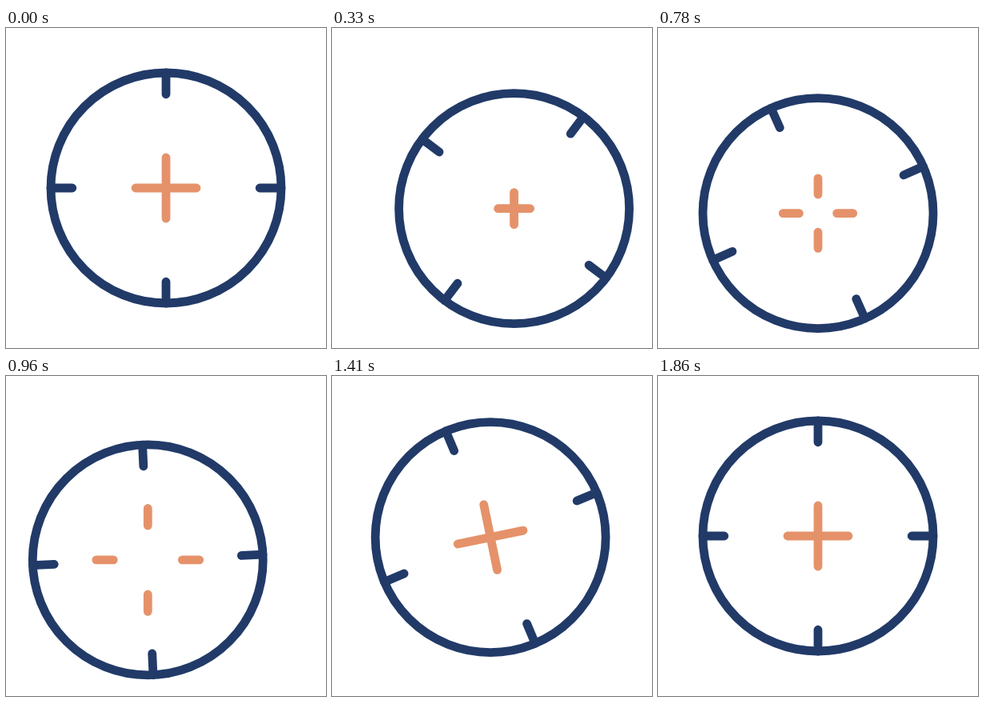
Recreate the animation shown at these times as an HTML page with a canvas. Size 400x400 px, loop 3.92 s.

```html
<!DOCTYPE html>
<html lang="en">
<head>
<meta charset="utf-8">
<title>Crosshair</title>
<style>
  html, body { margin: 0; width: 100%; height: 100%; overflow: hidden; background: #fff; }
  canvas { display: block; width: 100vmin; height: 100vmin; }
</style>
</head>
<body>
<canvas id="stage"></canvas>
<script>
const SIZE = 400, LOOP = 3920, STEP = 30, LAST = 62;
const NAVY = '#213a68', ORANGE = '#e5926a', LINE = 10.8;

const canvas = document.getElementById('stage');
const ctx = canvas.getContext('2d');

const mix = (a, b, p) => a + (b - a) * p;

// Cubic easing with flat ends: control points (x1, 0) and (x2, 1).
function ease(t, x1, x2) {
  if (t <= 0) return 0;
  if (t >= 1) return 1;
  let lo = 0, hi = 1, u = 0.5;
  for (let i = 0; i < 30; i++) {
    u = (lo + hi) / 2;
    const v = 1 - u;
    const x = 3 * u * v * v * x1 + 3 * u * u * v * x2 + u * u * u;
    if (x < t) lo = u; else hi = u;
  }
  return u * u * (3 - 2 * u);
}

const span = (n, from, to, x1, x2) => ease((n - from) / (to - from), x1, x2);

function makePath(d) {
  const path = document.createElementNS('http://www.w3.org/2000/svg', 'path');
  path.setAttribute('d', d);
  const length = path.getTotalLength();
  return p => path.getPointAtLength(p * length);
}

const goRight = makePath('M200 200C210 208.5 227.5 221 228.1 227.5');
const goLeft = makePath('M228.1 227.5C226.3 233 174 233 171.9 227.5');
const goHome = makePath('M171.9 227.5C172.5 221 190 208.5 200 200');

function centerAt(n) {
  if (n < 16) return goRight(span(n, 0, 16, 0.25, 0.07));
  if (n < 36) return goLeft(span(n, 16, 36, 0.33, 0.67));
  return goHome(span(n, 36, 52, 0.55, 0.13));
}

function poseAt(n) {
  if (n < 17) {
    const p = span(n, 0, 17, 0.46, 0.1);
    return { ring: 40 * p, cross: 0, inner: 0, outer: mix(38, 18.6, p) };
  }
  if (n < 35) {
    const p = span(n, 17, 35, 0.4, 0.57);
    return { ring: mix(40, 90, p), cross: 0, inner: 45.5 * p, outer: mix(18.6, 67, p) };
  }
  const p = span(n, 35, 56, 0.49, 0.12);
  return {
    ring: mix(90, 180, span(n, 35, 62, 0.47, 0.09)),
    cross: 90 * p,
    inner: Math.max(0, mix(45.5, -6.5, p)),
    outer: mix(67, 38, p)
  };
}

// Four radial strokes, a quarter turn apart.
function spokes(angle, from, to, color) {
  ctx.save();
  ctx.rotate(angle * Math.PI / 180);
  ctx.strokeStyle = color;
  ctx.beginPath();
  for (let i = 0; i < 4; i++) {
    ctx.moveTo(from, 0);
    ctx.lineTo(to, 0);
    ctx.rotate(Math.PI / 2);
  }
  ctx.stroke();
  ctx.restore();
}

function draw(n) {
  const scale = canvas.width / SIZE;
  const { x, y } = centerAt(n);
  const pose = poseAt(n);
  ctx.setTransform(scale, 0, 0, scale, 0, 0);
  ctx.fillStyle = '#fff';
  ctx.fillRect(0, 0, SIZE, SIZE);
  ctx.translate(x, y);
  ctx.lineWidth = LINE;
  ctx.lineCap = 'round';
  ctx.strokeStyle = NAVY;
  ctx.beginPath();
  ctx.arc(0, 0, 144, 0, 2 * Math.PI);
  ctx.stroke();
  spokes(pose.ring, 117.2, 144, NAVY);
  spokes(pose.cross, pose.inner, pose.outer, ORANGE);
}

function resize() {
  const side = Math.min(innerWidth, innerHeight) || SIZE;
  canvas.width = canvas.height = Math.round(side * (window.devicePixelRatio || 1));
}

const start = performance.now();
function tick() {
  const t = Math.max(0, performance.now() - start) % LOOP;
  draw(Math.min(LAST, Math.floor(t / STEP)));
  requestAnimationFrame(tick);
}

addEventListener('resize', resize);
resize();
tick();
</script>
</body>
</html>
```
